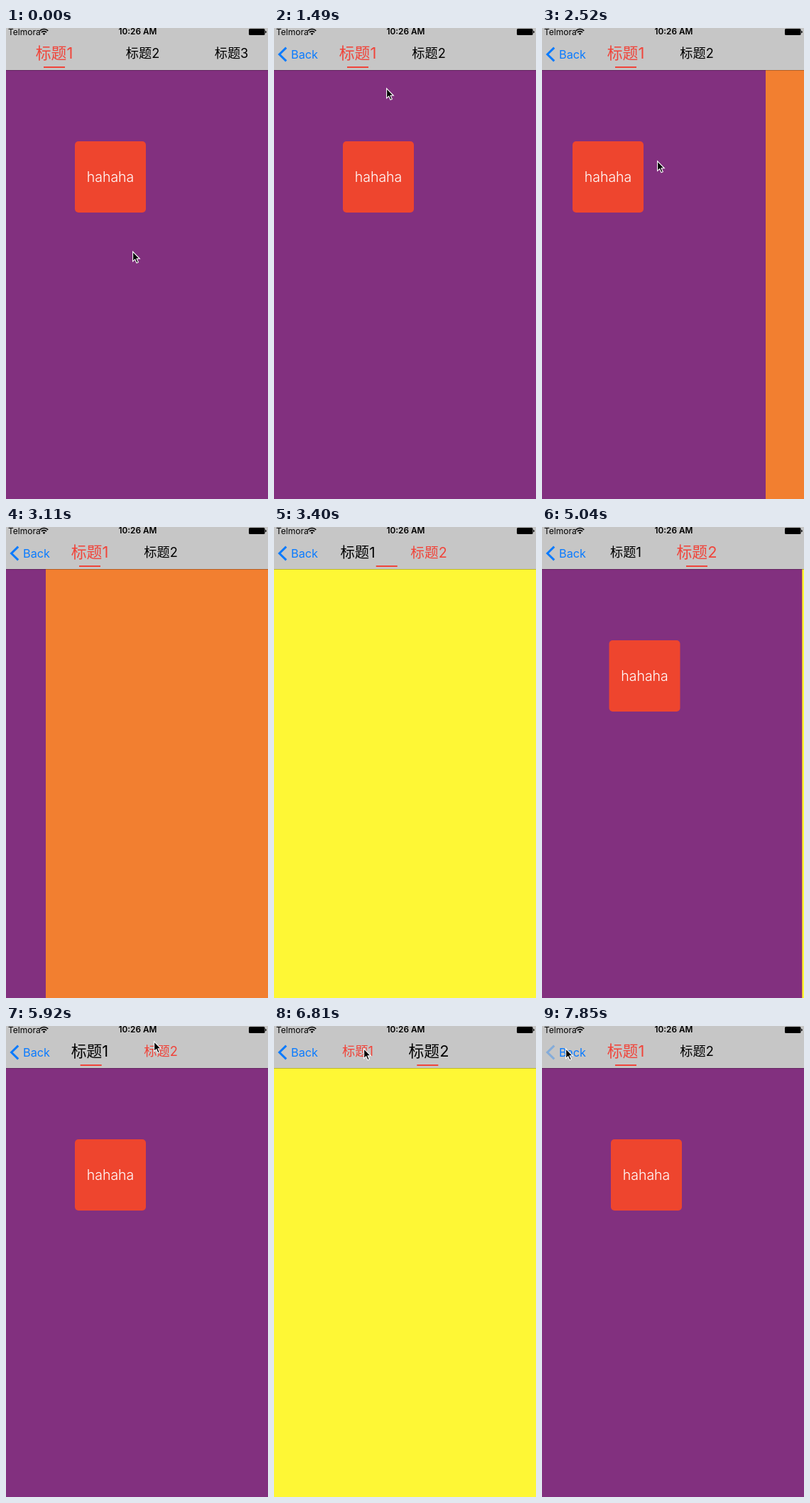
Recreate the animation shown at these times as an HTML page. Size 369x661 px, loop 8 s.

```html
<!DOCTYPE html>
<html lang="zh">
<head>
<meta charset="utf-8">
<title>Tabs</title>
<style>
  html, body { margin: 0; width: 100%; height: 100%; overflow: hidden; }
  body { font-family: Inter, "Noto Sans CJK SC", "Noto Sans CJK", "Noto Sans CJK JP", sans-serif; }
  #stage { position: relative; width: 369px; height: 661px; overflow: hidden; background: #82307f; }
  #stage div, #stage svg { position: absolute; }
  .view, .page { left: 0; top: 59px; width: 369px; height: 602px; overflow: hidden; }
  .page { top: 0; background: #82307f; }
  #pager { background: #f27f30; }
  #second { background: #fef735; }
  #dim { inset: 0; background: #000; }
  .box {
    left: 97px; top: 100px; width: 100px; height: 100px; border-radius: 5px;
    background: #ee452e; color: #fff; text-align: center;
    font-size: 19.5px; font-weight: 300; line-height: 100px;
  }
  #bar { left: 0; top: 0; width: 369px; height: 59px; background: #c6c6c6; box-shadow: 0 1px rgba(0, 0, 0, .25); }
  .tabs { left: 0; top: 0; width: 369px; height: 59px; }
  .tab { top: 20px; width: 100px; height: 30px; margin-left: -50px; line-height: 30px; text-align: center; font-size: 18.2px; }
  .line { top: 54px; width: 30px; height: 2px; margin-left: -15px; background: #f0443a; }
  .back { left: 24px; top: 27px; color: #0a7bff; font-size: 16.3px; line-height: 20px; }
  .status { top: -2px; line-height: 15px; font-size: 12px; white-space: nowrap; }
  #clock { left: 0; width: 371px; text-align: center; font-size: 11.8px; font-weight: 600; }
  svg { left: 0; top: 0; overflow: visible; }
</style>
</head>
<body>
<div id="stage">
  <div class="view" id="root"><div class="box">hahaha</div><div id="dim"></div></div>
  <div class="view" id="pager">
    <div class="page" id="first"><div class="box">hahaha</div></div>
    <div class="page" id="second"></div>
  </div>
  <div id="bar">
    <div class="tabs" id="rootTabs"></div>
    <div class="tabs" id="subTabs"></div>
    <svg id="chevron" width="24" height="59"><path d="M17.2 27.6 7.6 37l9.6 9.4" fill="none" stroke="#0a7bff" stroke-width="3"/></svg>
    <div class="back" id="back">Back</div>
    <div class="status" style="left:3px">Telmora</div>
    <div class="status" id="clock">10:26 AM</div>
    <svg width="369" height="12">
      <g fill="none" stroke="#000" stroke-width="1.7">
        <path d="M47.8 3.9a8 8 0 0 1 11.4 0M49.9 6.2a5 5 0 0 1 7.2 0"/>
      </g>
      <path d="M53.5 10 51.6 8a2.7 2.7 0 0 1 3.8 0z"/>
      <rect x="342" y="1" width="22.5" height="9" rx="1.5"/>
      <path d="M365.2 3.7q1.6.4 1.6 1.8t-1.6 1.8z"/>
    </svg>
  </div>
  <svg id="cursor" width="12" height="18">
    <path d="M.6.8V14.6l3.1-2.9 2.3 5 2.3-1-2.2-4.9h4.2z" fill="#000" stroke="#fff" stroke-width="1.1"/>
  </svg>
</div>
<script>
const LOOP = 8000, STEPS = 54, W = 369, RED = '#f0443a';
const $ = id => document.getElementById(id);

// [step, x, y]
const pointer = [
  [0, 178, 313], [1, 170, 273], [2, 159, 234], [8, 159, 234], [10, 158, 84],
  [12, 193, 52], [14, 245, 190], [15, 245, 190], [16, 226, 188], [20, -30, 180],
  [25, -30, 120], [26, 27, 124], [28, 114, 160], [29, 114, 160], [30, 193, 157],
  [32, 390, 160], [35, 390, 290], [37, 357, 296], [38, 208, 21], [42, 208, 21],
  [44, 126, 31], [48, 126, 31], [52, 33, 31]
];
// [step, distance scrolled] for the two drags
const drags = [
  [15, 0], [16, 9], [17, 54], [18, 132], [19, 212], [20, 275], [21, 313], [22, 358], [23, W],
  [29, W], [30, 356], [31, 265], [32, 115], [33, 24], [34, 2.5], [35, 0]
];
// [step, tab index]
const picks = [[22.26, 1], [35.3, 0], [39.87, 1], [45.87, 0]];
const taps = [[40, 1], [46, 0]];

const clamp = x => Math.min(1, Math.max(0, x));
const ease = x => { x = clamp(x); return x * x * (3 - 2 * x); };
const slide = (el, x, y = 0) => { el.style.transform = `translate(${x}px, ${y}px)`; };

function at(keys, s) {
  const i = keys.findIndex(k => k[0] > s);
  if (i < 0) return keys[keys.length - 1].slice(1);
  if (i === 0) return keys[0].slice(1);
  const a = keys[i - 1], b = keys[i], p = (s - a[0]) / (b[0] - a[0]);
  return a.slice(1).map((v, n) => v + (b[n + 1] - v) * p);
}

// Eased value after all moves begun by step s
function follow(moves, s, span, value = 0) {
  for (const [start, to] of moves) {
    if (s >= start) value += (to - value) * ease((s - start) / span);
  }
  return value;
}

function makeTabs(host, centers) {
  const add = (cls, x, text) => {
    const el = document.createElement('div');
    el.className = cls;
    el.style.left = x + 'px';
    el.textContent = text;
    return host.appendChild(el);
  };
  const tabs = centers.map((x, i) => add('tab', x, '标题' + (i + 1)));
  const line = add('line', centers[0], '');
  return (pos, picked) => {
    tabs.forEach((el, i) => {
      el.style.color = i === picked ? RED : '#000';
      el.style.transform = `scale(${1 + .2 * clamp(1 - Math.abs(pos - i))})`;
    });
    slide(line, pos * (centers[1] - centers[0]));
  };
}

const setRoot = makeTabs($('rootTabs'), [67.5, 192.5, 317.5]);
const setSub = makeTabs($('subTabs'), [118, 218]);
setRoot(0, 0);

function draw(s) {
  const push = s < 5 ? 0 : 1 - (1 - clamp((s - 4.7) / 3.6)) ** 3;
  slide($('root'), -.3 * W * push);
  $('dim').style.opacity = .1 * push;
  slide($('pager'), W * (1 - push));
  slide($('rootTabs'), -120 * push);
  $('rootTabs').style.opacity = clamp(1 - 1.5 * push);
  slide($('subTabs'), 150 * (1 - push));
  $('subTabs').style.opacity = push;
  slide($('back'), 110 * (1 - push));
  $('back').style.opacity = push;
  $('chevron').style.opacity = push * (s >= 53 ? .35 : 1);

  const x = s < 40 ? at(drags, s)[0] : W * follow(taps, s, 2.05);
  slide($('first'), -x);
  slide($('second'), W - x);
  $('second').style.visibility = s < 23 ? 'hidden' : 'visible';

  const last = picks.filter(p => s >= p[0]).pop();
  setSub(follow(picks, s, 1.69), last ? last[1] : 0);
  slide($('cursor'), ...at(pointer, s));
}

const begin = performance.now();
function tick() {
  const t = (performance.now() - begin) % LOOP;
  draw(Math.floor((t + 9) * STEPS / LOOP) % STEPS);
  requestAnimationFrame(tick);
}
tick();
</script>
</body>
</html>
```
